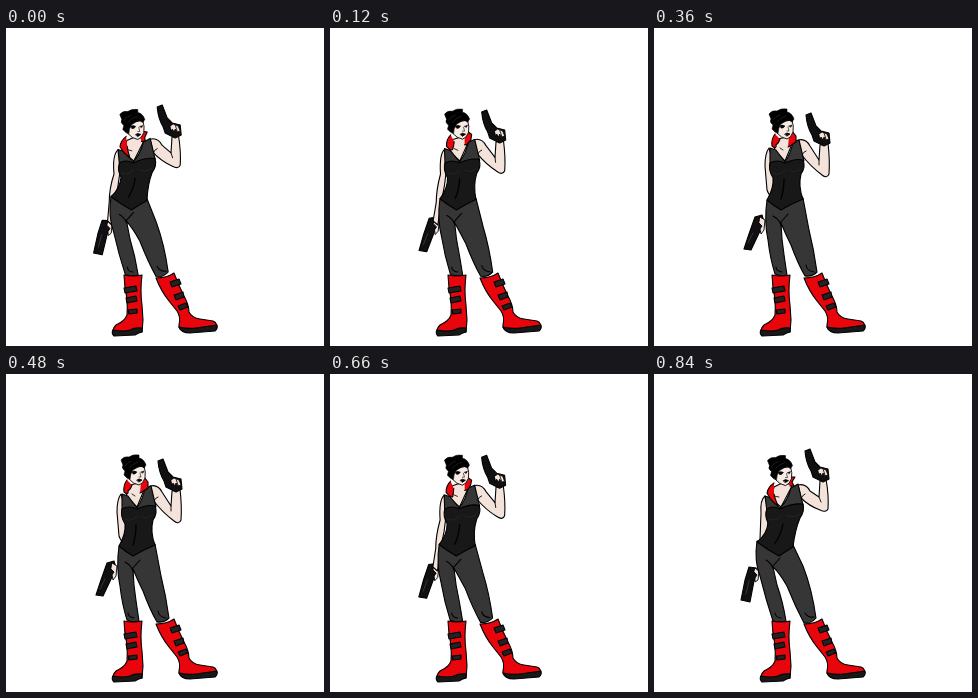
These frames come from a looping animation (318x318 px, 0.96 s). An HTML page with a canvas:

```html
<!DOCTYPE html>
<html>
<head>
<meta charset="utf-8">
<style>
html, body { margin: 0; width: 100%; height: 100%; overflow: hidden; background: #fff; }
canvas { display: block; }
</style>
</head>
<body>
<canvas id="stage" width="318" height="318"></canvas>
<script>
const ctx = document.getElementById('stage').getContext('2d');
const RED = '#e8060c', GREY = '#363636', VEST = '#181818', SKIN = '#f3e3da', FACE = '#f7ebe4', BLACK = '#000', GUN = '#101012';

// [start ms, sway]: 0 leans to the left, 1 stands upright
const steps = [[0, .2], [60, .45], [120, .7], [180, .88], [240, 1], [360, 1], [480, 1],
  [600, .87], [660, .62], [720, .32], [780, .12], [840, 0]];
let sway = 0;

const mix = (a, b) => a + (b - a) * sway;
function blend(from, to) {
  const ends = to.match(/[\d.]+/g);
  let i = 0;
  return from.replace(/[\d.]+/g, n => mix(+n, +ends[i++]));
}
function shape(fill, from, to = from, line = 1.1) {
  const path = new Path2D(blend(from, to));
  if (fill) { ctx.fillStyle = fill; ctx.fill(path); }
  if (line) { ctx.lineWidth = line; ctx.stroke(path); }
}
function moved(dx, dy, draw) {
  ctx.save();
  ctx.translate(dx * (1 - sway), dy * (1 - sway));
  draw();
  ctx.restore();
}

function boots() {
  shape(RED, 'M118 247Q127 249 136 247Q134 263 136 277L137 292L136 304L108 307Q105 302 110 297Q119 293 121 287Q122 272 119 260Z');
  shape(VEST, 'M107 302Q118 304 124 302Q129 299 136 300L136 304Q132 305 129 307L108 308Q105 305 107 302Z');
  shape(RED, 'M150 250Q161 250 168 245Q172 256 178 268Q183 277 183 284Q186 290 194 291L207 293Q212 295 210 301L178 303Q172 301 173 297Q175 289 171 283L163 273Q155 263 150 250Z');
  shape(VEST, 'M173 299Q182 301 190 300L211 297Q212 301 209 303L184 305Q175 305 173 299Z');
  for (const s of ['M118 260L130 258L131 263L119 265Z', 'M120 270L130 268L131 273L121 275Z', 'M122 282L131 281L131 285L123 286Z',
    'M164 254L173 251L175 256L166 259Z', 'M168 267L177 264L178 269L170 272Z', 'M172 278L180 275L182 279L174 282Z'])
    shape('#222', s);
}

function legs() {
  shape(GREY,
    'M103 167Q100 187 106 202Q112 226 119 247Q127 249 132 247Q129 228 123 211L119 193Q125 198 133 212Q141 232 150 249Q157 250 162 244Q158 215 149 192L139 171Z',
    'M113 172Q110 193 114 212Q116 230 121 246Q127 249 133 247Q130 228 128 211L127 195Q131 205 137 217Q144 236 151 248Q158 249 163 244Q160 222 155 202L149 170Z');
  shape('', 'M112 186Q117 189 119 194M118 193L126 184M121 239Q122 244 127 244M151 239Q154 244 160 243',
    'M119 188Q125 191 127 197M126 195L134 186M122 239Q122 243 128 244M152 237Q153 243 160 244');
}

function lowerArm(bent) {
  if (bent)
    shape(SKIN, 'M111 122Q106 126 107 139L106 165Q110 170 114 165L114 130Z',
      'M115 120Q111 125 111 138L113 162Q116 171 121 166L118 130Z');
  else
    shape(SKIN, 'M111 122Q105 127 107 146Q102 160 102 174L101 193L105 197Q107 175 111 158L115 131Z',
      'M116 121Q111 126 112 146Q108 163 108 175L104 193L109 197Q112 176 116 157L119 130Z');
}
function lowerGun() {
  shape(GUN, 'M95 193L102 194L104 199L100 207L96 228L87 226L91 206Z',
    'M101 189L108 187L110 194L106 203L97 222L90 221L95 206Z');
  shape(SKIN, 'M101 194L105 197L104 206L101 208L101 204L103 201L100 198Z',
    'M106 189L111 192L110 202L107 206L106 201L108 198L105 195Z', .9);
  ctx.strokeStyle = '#454545';
  shape('', 'M95 207L92 220', 'M99 205L94 215', .7);
  ctx.strokeStyle = BLACK;
}

function torso() {
  shape(SKIN, 'M120 113L134 106L138 112L127 133L117 125Z', 'M124 111L137 108L138 116L131 133L120 122Z');
  shape(GREY, 'M111 122L117 124L126 134Q134 126 137 114L144 110L149 131L113 138Z',
    'M116 120L122 122L131 134Q137 125 139 114L145 112L150 133L116 140Z');
  shape(VEST,
    'M113 135Q119 131 126 135Q138 129 149 130Q151 137 146 144Q141 156 139 173Q131 178 125 182Q114 176 103 168Q113 160 114 149Q110 141 113 135Z',
    'M116 135Q123 131 131 135Q141 130 149 132Q152 139 147 146Q144 158 149 171Q137 176 127 182Q120 178 113 172Q120 160 119 150Q114 142 116 135Z');
  shape('', 'M129 150Q127 161 121 169', 'M130 151Q130 162 127 171', 1.3);
  ctx.strokeStyle = '#333';
  shape('', 'M115 145Q121 148 127 142M132 141Q139 145 146 140', 'M119 145Q125 149 131 142M135 142Q141 146 146 141', .5);
  ctx.strokeStyle = BLACK;
}

function collar() {
  shape(RED, 'M120 109Q114 113 113 119Q117 127 124 132Q121 125 120 120L124 113Z',
    'M121 106Q117 111 118 118L123 122Q122 117 125 115L126 111Z');
  shape(RED, 'M134 110L135 103L141 103L138 108L140 112L136 112Q134 124 127 132Q133 119 134 110Z',
    'M135 108L138 103Q142 108 142 114L136 118Q134 119 135 114Z');
  shape('', 'M120 122L125 123', 'M126 120L129 122', .8);
}

function raisedArm() {
  shape(SKIN,
    'M144 111Q152 109 156 117L165 123L166 107L172 105Q175 122 174 135Q172 139 166 136Q155 132 147 124Z',
    'M144 112Q152 110 156 118L165 132L166 117L174 115Q176 133 175 146Q173 151 168 147Q156 138 147 126Z');
  shape('', 'M147 125Q148 121 151 120M165 123L167 128', 'M148 127Q149 124 152 123M165 132L165 137', .9);
  moved(-1, -10, () => {
    shape(GUN, 'M152 87L157 85L162 98L167 103L175 105L176 115L170 118L160 113L158 107Q153 99 152 87Z');
    shape(SKIN, 'M165 106L168 104L173 106L175 111L172 112L170 109L169 112L167 109L166 111Z', undefined, .8);
    shape('', 'M170 105L172 111', undefined, .8);
  });
}

function head() {
  moved(-1.5, .6, () => {
    shape(FACE, 'M124 98Q126 92 131 93L138 92Q140 98 139 104Q137 110 133 111Q127 110 123 105Z', undefined, .9);
    shape(BLACK, 'M121 104L118 101L119 97Q115 94 117 91L115 86Q118 82 123 83Q127 80 133 81L133 84Q138 85 140 91L138 94Q135 91 132 93L127 96Q124 100 124 105Z', undefined, .6);
    shape(BLACK, 'M126 98Q128 96 131 98Q129 101 127 100ZM135 98L138 97L137 99Z', undefined, .5);
    shape(BLACK, 'M131 106L133 105L136 106L133 108Z', undefined, .8);
    shape('', 'M134 99L135 103L133 103', undefined, .6);
    ctx.strokeStyle = '#35383d';
    shape('', 'M119 92Q121 88 126 87M123 94Q126 90 132 88', undefined, .5);
    ctx.strokeStyle = BLACK;
  });
}

function draw(now) {
  const t = now % 960;
  sway = steps.findLast(s => s[0] <= t)[1];
  const bent = sway > .9 || sway < .05;
  ctx.fillStyle = '#fff';
  ctx.fillRect(0, 0, 318, 318);
  ctx.lineJoin = ctx.lineCap = 'round';
  ctx.strokeStyle = BLACK;
  lowerGun();
  lowerArm(bent);
  legs();
  boots();
  raisedArm();
  torso();
  collar();
  head();
  requestAnimationFrame(draw);
}
draw(performance.now());
</script>
</body>
</html>
```
